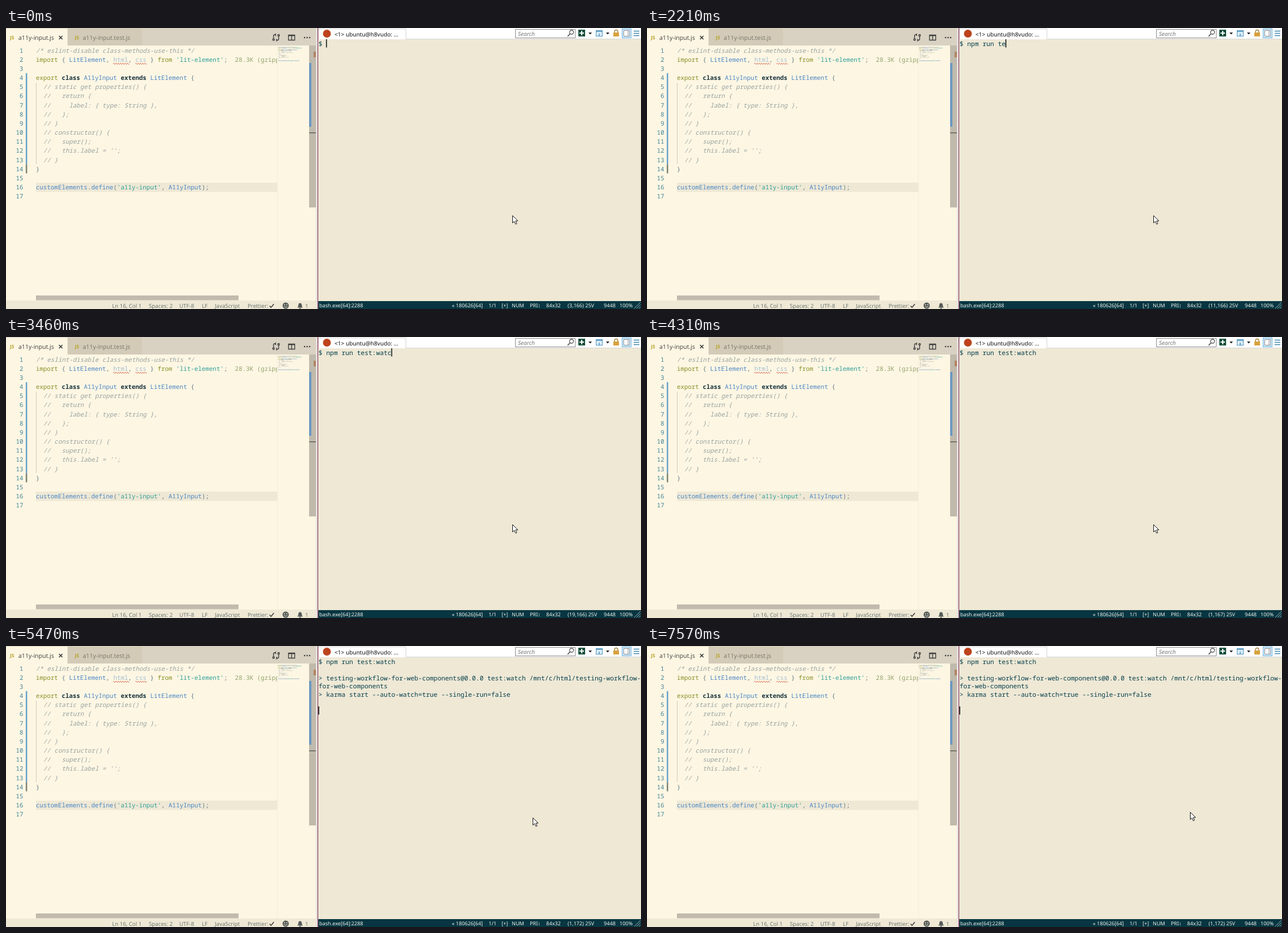
Recreate the animation shown at these times as an HTML page. Size 1125 px wide and 498 px high, loop 8000 ms.

```html
<!DOCTYPE html>
<html lang="en">
<head>
<meta charset="utf-8">
<title>Editor and terminal</title>
<style>
  html, body { margin: 0; width: 100%; height: 100%; overflow: hidden; background: #fdf6e3; }
  svg { display: block; width: 1125px; height: 498px; }
  text { white-space: pre; text-rendering: geometricPrecision; }
  .code { font: 10.88px "Noto Sans Mono", "DejaVu Sans Mono", monospace; }
  .term { font: 11.33px "Noto Sans Mono", "DejaVu Sans Mono", monospace; fill: #073f4c; }
  .tab { font: 10.56px "Open Sans", "Noto Sans", sans-serif; }
  .info { font: 9.75px "Open Sans", "Noto Sans", sans-serif; fill: #66706c; }
  .bar { font: 9.15px "Noto Sans", "Open Sans", sans-serif; fill: #f2f3ea; }
  .title { font: 10.1px "Noto Sans", "Open Sans", sans-serif; fill: #111; }
  .find { font: italic 10px "Noto Sans", "Open Sans", sans-serif; fill: #777; }
  .js { font: bold 8.5px "Open Sans", "Noto Sans", sans-serif; fill: #b5a32a; }
</style>
</head>
<body>
<svg id="stage" viewBox="0 0 1125 498">
  <defs>
    <clipPath id="codeClip"><rect x="0" y="31" width="481" height="440"/></clipPath>
  </defs>

  <!-- editor frame -->
  <rect width="549" height="498" fill="#fdf6e3"/>
  <rect width="549" height="31" fill="#d9d2c2"/>
  <rect y="1" width="109" height="30" fill="#fdf6e3"/>
  <rect x="109" y="1" width="132" height="30" fill="#d3cbb7"/>
  <text class="js" x="7" y="20">JS</text>
  <text class="tab" x="22" y="21" fill="#3d3d3d">a11y-input.js</text>
  <path d="M94 14l6 6m0-6l-6 6" stroke="#333" stroke-width="1.5"/>
  <text class="js" x="122" y="20">JS</text>
  <text class="tab" x="136" y="21" fill="#777468" font-style="italic">a11y-input.test.js</text>
  <g fill="none" stroke="#3e3e3e" stroke-width="1.4">
    <path d="M478 12h-2.5q-1.5 0-1.5 1.5v5m4.500-8.500l-2 2 2 2M479 21.5h2.500q1.500 0 1.500-1.500v-5m-4.500 8.500l2-2-2-2"/>
    <circle cx="474" cy="20.5" r="1.5"/><circle cx="483" cy="13" r="1.5"/>
    <path d="M500.5 12.5h11v9h-11zM506 12v10M500 13.5h12"/>
  </g>
  <g fill="#3e3e3e"><circle cx="529" cy="17" r="1.3"/><circle cx="533.5" cy="17" r="1.3"/><circle cx="538" cy="17" r="1.3"/></g>

  <!-- editor body -->
  <rect x="53" y="274" width="428" height="16.5" fill="#eee8d5"/>
  <rect x="35" y="80" width="2.5" height="161.5" fill="#66a3cf"/>
  <rect x="35" y="241.5" width="2.5" height="16" fill="#7d8372"/>
  <rect x="53" y="97" width="1" height="144" fill="#cfcab8"/>
  <g id="code" class="code" clip-path="url(#codeClip)"></g>
  <g id="minimap"></g>
  <rect x="480.5" y="31" width="1" height="452" fill="#f3ecd9"/>
  <rect x="537" y="31" width="12" height="287" fill="#bfbaac"/>
  <rect x="537" y="62" width="4" height="113" fill="#6b98c2"/>
  <rect x="545" y="42" width="4" height="10" fill="#b38463"/>
  <rect x="537" y="185" width="12" height="1.5" fill="#5f6058"/>
  <rect x="53" y="474" width="359" height="8.5" fill="#c0bbad"/>

  <!-- editor footer -->
  <rect y="483" width="549" height="15" fill="#eee8d5"/>
  <g id="info" class="info"></g>
  <path d="M467 492.5l2.500 2.800 5-6" fill="none" stroke="#444" stroke-width="1.7"/>
  <circle cx="495.5" cy="492" r="5.5" fill="#555b58"/>
  <g fill="#eee8d5"><circle cx="493.5" cy="490.5" r="1"/><circle cx="497.5" cy="490.5" r="1"/></g>
  <path d="M492.5 493.5q3 3 6 0" fill="none" stroke="#eee8d5"/>
  <path d="M516 495.5q2-1.500 2-4.500 0-3.500 3-3.500t3 3.500q0 3 2 4.500zM519.5 496h3v1.5h-3z" fill="#555b58"/>

  <!-- terminal frame -->
  <rect x="549" width="576" height="498" fill="#fff"/>
  <rect x="549" width="3" height="498" fill="#e6dfdd"/>
  <rect x="552" width="1.3" height="498" fill="#7d2f49"/>
  <rect x="553.3" y="20" width="572" height="464" fill="#eee8d5"/>
  <path d="M553 1.5h155.5v18H1125" fill="none" stroke="#d4d4d4"/>
  <circle cx="568.5" cy="10" r="7" fill="#bd431d"/>
  <text class="title" x="582" y="15">&lt;1&gt; ubuntu@h8vudo: ...</text>
  <rect x="902.5" y="2.5" width="106" height="15" fill="#fff" stroke="#8b8b8b"/>
  <text class="find" x="907" y="13.5">Search</text>
  <g fill="none" stroke="#555" stroke-width="1.3"><circle cx="1002" cy="7.5" r="3.5"/><path d="M999.5 10l-4.500 5" stroke-width="1.8"/></g>
  <rect x="1014" y="3" width="12" height="12" fill="#17503c"/>
  <path d="M1020 5v8m-4-4h8" stroke="#fff" stroke-width="2"/>
  <path d="M1032 8h6l-3 3.500zM1063 8h6l-3 3.500z" fill="#222"/>
  <rect x="1045.5" y="4.5" width="11" height="10" fill="#dceef9" stroke="#4d92bd"/>
  <path d="M1046 6h10M1051 10v4" stroke="#4d92bd" stroke-width="1.5"/>
  <path d="M1078 9v-2q0-3.500 3-3.500t3 3.500v2" fill="none" stroke="#a9853e" stroke-width="1.5"/>
  <rect x="1076" y="8" width="10" height="7" fill="#d8a23c"/>
  <rect x="1091.5" y="1.5" width="16" height="16" fill="#cfe8f8" stroke="#6db3dc"/>
  <path d="M1094.5 4.5h10v10h-10zM1102 5v9" fill="#fff" stroke="#8a8f94"/>
  <path d="M1112 5.5h10m-10 4h10m-10 4h10" stroke="#3d86ad" stroke-width="1.6"/>

  <!-- terminal text -->
  <g class="term">
    <text id="prompt" x="553.7" y="31.8"></text>
    <g id="output"></g>
  </g>
  <rect id="caret" width="1.7" height="14.5" fill="#1c2526"/>

  <!-- terminal footer -->
  <rect x="553.3" y="484" width="572" height="14" fill="#073642"/>
  <g id="bar" class="bar"></g>
  <text id="place" class="bar" x="995" y="494.5"></text>
  <path d="M1113 497l11-11m-7 11l7-7m-3 7l3-3" stroke="#9eb0b2"/>

  <path id="mouse" d="M.5.5v13l3-2.800 2.300 5 2.200-1-2.200-4.800h4.200z" fill="#fff" stroke="#111"/>
</svg>
<script>
const $ = id => document.getElementById(id);

function add(parent, tag, attrs, content) {
  const el = document.createElementNS("http://www.w3.org/2000/svg", tag);
  for (const key in attrs) el.setAttribute(key, attrs[key]);
  if (content) el.textContent = content;
  return parent.appendChild(el);
}

// Token styles of the code listing
const STYLES = {
  c: { fill: "#98a3a0", "font-style": "italic" },
  k: { fill: "#859024" },
  b: { fill: "#17333c", "font-weight": "bold" },
  n: { fill: "#4a86c5" },
  f: { fill: "#a3bfd2" },
  s: { fill: "#2f9f98" },
  p: { fill: "#657b83" },
  g: { fill: "#93a36c" }
};

const comment = s => [["c", s]];
const CODE = [
  comment("/* eslint-disable class-methods-use-this */"),
  [["k", "import"], ["p", " { "], ["n", "LitElement"], ["p", ", "], ["f", "html"], ["p", ", "], ["f", "css"],
   ["p", " } "], ["k", "from "], ["s", "'lit-element'"], ["p", ";"], ["g", "  28.3K (gzipped"]],
  [],
  [["k", "export "], ["b", "class "], ["n", "A11yInput "], ["b", "extends "], ["n", "LitElement"], ["p", " {"]],
  comment("  // static get properties() {"),
  comment("  //   return {"),
  comment("  //     label: { type: String },"),
  comment("  //   };"),
  comment("  // }"),
  comment("  // constructor() {"),
  comment("  //   super();"),
  comment("  //   this.label = '';"),
  comment("  // }"),
  [["p", "}"]],
  [],
  [["n", "customElements"], ["p", "."], ["n", "define"], ["p", "("], ["s", "'a11y-input'"], ["p", ", "],
   ["n", "A11yInput"], ["p", ");"]],
  []
];

const CHAR = 6.53, ROW = 16.15;

function wave(x, y, width) {
  let d = `M${x} ${y}`;
  for (let i = 0; i < width / 4; i++) d += "q1-2.5 2 0t2 0";
  add($("code"), "path", { d, fill: "none", stroke: "#d0674c" });
}

CODE.forEach((line, row) => {
  const y = 43.7 + row * ROW;
  add($("code"), "text", { x: 30.5, y, fill: "#3f8398", "text-anchor": "end" }, String(row + 1));
  let col = 0;
  for (const [kind, str] of line) {
    const lead = str.length - str.trimStart().length;
    const x = 53 + (col + lead) * CHAR;
    add($("code"), "text", { x, y, ...STYLES[kind] }, str.trim());
    if (kind === "f") wave(x, y + 3.5, str.length * CHAR);
    if (kind !== "g") {
      // each word becomes a thin dash in the overview
      for (const word of str.matchAll(/\S+/g))
        add($("minimap"), "rect", {
          x: 482 + (col + word.index) * 0.8, y: 33.5 + row * 1.6,
          width: word[0].length * 0.8, height: 1, fill: STYLES[kind].fill, opacity: 0.55
        });
    }
    col += str.length;
  }
});

function labels(id, y, items) {
  for (const [x, str] of items) add($(id), "text", { x, y }, str);
}
labels("info", 495.5, [[188, "Ln 16, Col 1"], [253, "Spaces: 2"], [307, "UTF-8"], [347, "LF"],
  [370, "JavaScript"], [428, "Prettier:"], [530, "1"]]);
labels("bar", 494.5, [[555, "bash.exe[64]:2288"], [790, "« 180626[64]"], [855, "1/1"], [878, "[+]"],
  [896, "NUM"], [928, "PRI↕"], [957, "84x32"], [1059, "9448"], [1087, "100%"]]);

const TERM_ROW = 14.5;
["> testing-workflow-for-web-components@0.0.0 test:watch /mnt/c/html/testing-workflow-",
 "for-web-components",
 "> karma start --auto-watch=true --single-run=false"
].forEach((str, i) => add($("output"), "text", { x: 553.7, y: 31.8 + (i + 2) * TERM_ROW }, str));

// Step tables: [time in ms, value]
const LOOP = 8000, COMMAND = "npm run test:watch";
const TYPED = [[0, 0], [820, 1], [890, 2], [960, 3], [1130, 4], [1510, 5], [1680, 6], [1760, 7], [1840, 8],
  [2210, 10], [2380, 11], [2520, 12], [2840, 13], [2910, 14], [3060, 15], [3210, 16], [3460, 17], [3620, 18]];
const CARET_ROW = [[0, 0], [3760, 1], [4460, 6]];
const BLINK = [0, 340, 820, 4230, 4460, 4940, 5470, 6050, 6550, 7140, 7570].map((t, i) => [t, i % 2 === 0]);
const PLACE = [[0, "3,166"], [890, "4,166"], [960, "5,166"], [1510, "7,166"], [2210, "11,166"],
  [2760, "18,166"], [3460, "19,166"], [4310, "1,167"], [4770, "1,172"]];
const MOUSE = [[0, [897, 332]], [5090, [895, 332]], [5170, [901, 328]], [5240, [909, 322]], [5320, [918, 315]],
  [5390, [926, 309]], [5470, [933, 304]], [5550, [941, 300]], [5620, [948, 297]], [5700, [955, 295]],
  [5780, [960, 294]], [5860, [962, 294]]];

const at = (table, t) => table.findLast(step => step[0] <= t)[1];

function draw(t) {
  const typed = at(TYPED, t), row = at(CARET_ROW, t);
  const col = row ? 0 : typed + 2;
  $("prompt").textContent = "$ " + COMMAND.slice(0, typed);
  $("output").style.display = t >= 4460 ? "" : "none";
  $("caret").setAttribute("x", 553.3 + col * 6.8);
  $("caret").setAttribute("y", 20 + row * TERM_ROW);
  $("caret").style.display = at(BLINK, t) ? "" : "none";
  $("place").textContent = `(${at(PLACE, t)}) 25V`;
  $("mouse").setAttribute("transform", `translate(${at(MOUSE, t)})`);
}

const start = performance.now();
function tick() {
  draw(Math.max(0, performance.now() - start) % LOOP);
  requestAnimationFrame(tick);
}
tick();
</script>
</body>
</html>
```
